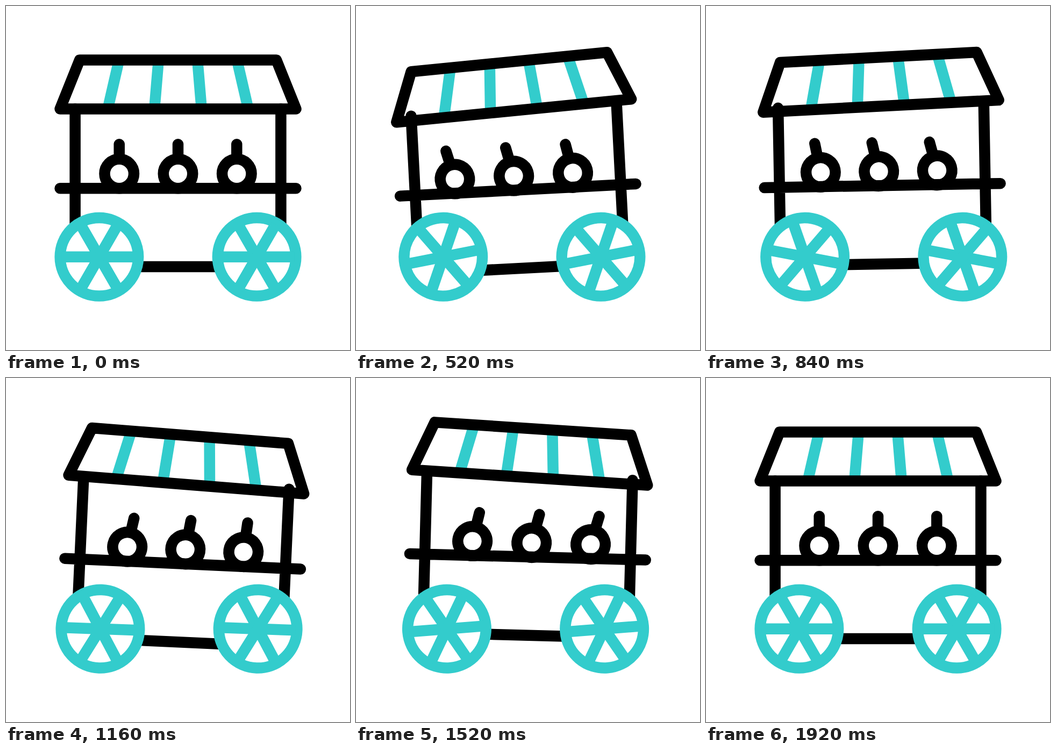
Animation of 640x640 px, one loop 2000 ms. Source, as an HTML page:

```html
<!DOCTYPE html>
<html lang="en">
<head>
<meta charset="utf-8">
<title>Street cart</title>
<style>
  html, body { margin: 0; width: 100%; height: 100%; overflow: hidden; background: #fff; }
  svg { display: block; width: 100%; height: 100%; }
  .ink { fill: none; stroke: #000; stroke-width: 20.5; stroke-linecap: round; stroke-linejoin: round; }
  .teal { fill: none; stroke: #3cc; stroke-width: 20.5; }
  .wheel circle { fill: #fff; }
</style>
</head>
<body>
<svg viewBox="0 0 640 640">
  <defs>
    <g id="wheel" class="teal wheel">
      <circle r="72.75"/>
      <path id="spoke" d="M-70 0H70"/>
      <path d="M-70 0H70" transform="rotate(60)"/>
      <path d="M-70 0H70" transform="rotate(-60)"/>
    </g>
    <g id="lamp" class="ink">
      <circle cy="-27.2" r="27.25"/>
      <path d="M0 -82V-55"/>
    </g>
  </defs>
  <g id="body">
    <path class="ink" d="M128.6 191.5V412M511.4 191.5V412M100.5 339.2H539.5M240 485H400"/>
    <g id="lamps"></g>
    <g id="roof">
      <path class="teal" d="M210.3 100.5L189.3 191.5M283.8 100.5L276.2 191.5M356.2 100.5L363.8 191.5M429.7 100.5L450.7 191.5"/>
      <path class="ink" d="M137 100.5H503L539.5 191.5H100.5Z"/>
    </g>
  </g>
  <use id="left" href="#wheel"/>
  <use id="right" href="#wheel"/>
</svg>
<script>
  const LOOP = 2000, STEP = 40, END = 1920;
  const $ = id => document.getElementById(id);
  const sine = u => (1 - Math.cos(Math.PI * u)) / 2;
  const out = u => 1 - (1 - u) ** 1.5;

  // Each key: [time, value, easing towards it]
  const ROLL = [[0, 0], [440, -12.8], [920, 12.4], [1380, -7], [END, 0, out]];
  const BOUNCE = [[0, 0], [384, 6.4], [768, -6.2], [1152, 6.3], [1536, -6.5], [END, 0]];
  const SWAY = [[0, 0], [560, -1], [1280, 1], [1760, 0]];

  function at(keys, t) {
    if (t <= 0) return 0;
    const i = keys.findIndex(k => k[0] > t);
    if (i < 0) return keys[keys.length - 1][1];
    const [t0, a] = keys[i - 1], [t1, b, ease = sine] = keys[i];
    return a + (b - a) * ease((t - t0) / (t1 - t0));
  }

  const lamps = [-109.3, 0, 109.3].map((dx, i) => {
    const el = document.createElementNS('http://www.w3.org/2000/svg', 'use');
    el.setAttribute('href', '#lamp');
    $('lamps').append(el);
    return { el, x: 320 + dx, delay: 80 + 40 * i };
  });

  const place = (el, value) => el.setAttribute('transform', value);

  function draw(t) {
    const roll = at(ROLL, t);
    place($('body'), `translate(${roll} ${at(BOUNCE, t)}) rotate(${3 * at(SWAY, t)} 320 485)`);
    place($('roof'), `rotate(${3 * at(SWAY, t - 80)} 320 191.5)`);
    for (const { el, x, delay } of lamps)
      place(el, `translate(${x} 339.2) rotate(${16.5 * at(SWAY, t - delay)})`);
    place($('left'), `translate(${173.4 + roll} 466.8) rotate(${roll})`);
    place($('right'), `translate(${466.6 + roll} 466.8) rotate(${roll})`);
  }

  const start = performance.now();
  function tick() {
    const t = (performance.now() - start) % LOOP;
    draw(Math.min(END, Math.floor(t / STEP) * STEP));
    requestAnimationFrame(tick);
  }
  tick();
</script>
</body>
</html>
```
